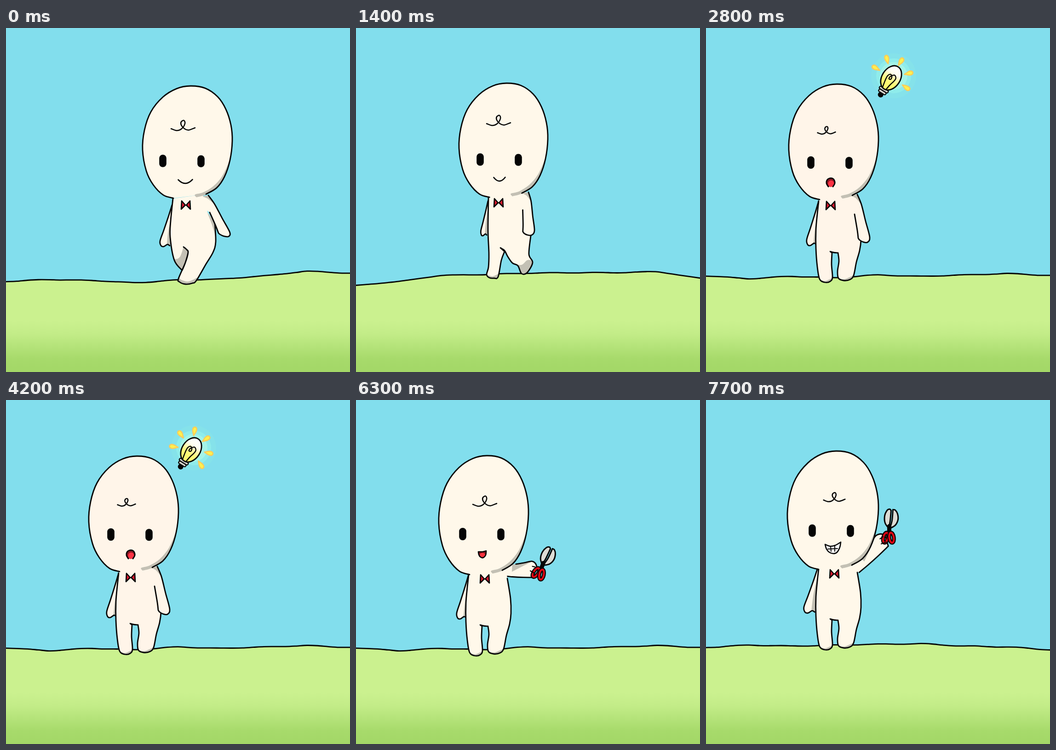
Recreate the animation shown at these times as an HTML page with a canvas. Size 748x748 px, loop 8 s.

```html
<!DOCTYPE html>
<html lang="en">
<head>
<meta charset="utf-8">
<title>A walk and an idea</title>
<style>
  html, body { margin: 0; width: 100%; height: 100%; overflow: hidden; background: #82deed; }
  canvas { display: block; }
</style>
</head>
<body>
<canvas id="stage" width="748" height="748"></canvas>
<script>
const ctx = document.getElementById('stage').getContext('2d');
const SIZE = 748, LOOP = 8000, STEP = 700;
const INK = '#050505', SKIN = '#fff8ea', SHADE = '#c3c0b4', RED = '#d8192f';

// Points are "x,y"; a bar marks a sharp corner at the point before it.
// Shared shapes are placed with [x, y, scaleX, scaleY, shear].
const head = '67,251 45,244 23,221 8,190 0,143 4,99 18,58 44,25 74,6 104,0 136,5 163,24 181,52 192,87 195,123 190,166 178,203 161,228 138,242';
const headShade = '190,164 174,200 154,224 132,238 114,243 117,249 | 138,243 161,228 178,203';
const curl = '-26,5 -14,9 -3,5 4,-6 2,-13 -4,-10 -4,-3 3,5 12,8 26,3';

const leftArm = {
  outline: '0,0 -7,24 -18,59 -26,84 -24,95 -18,97 -10,92 -5,95',
  inner: '15,60',
  shades: ['1,12 -8,60 -12,100 | 2,100']
};
const rightArm = {
  outline: '0,0 9,22 18,58 27,93 22,104 12,103 5,99 2,95 | 0,78 -6,43',
  inner: '-40,8',
  shades: ['-14,2 0,-3 9,22 | -3,8']
};
const raisedArm = {
  outline: '16,-15 34,-19 50,-23 58,-19 62,-11 | 54,12 | 33,13 10,13 -10,12',
  inner: '-20,-8',
  shades: ['8,-17 50,-24 32,-12 8,2']
};
const bodies = {
  standing: {
    outline: '245,378 242,405 239,440 239,480 242,520 247,547 258,554 270,552 275,543 273,515 274,490 | 270,487 | 277,489 287,490 | 289,508 286,530 288,545 299,550 313,548 321,539 327,510 334,485 337,462 336,430 329,386',
    inner: '326,358 | 250,370',
    shades: ['246,546 258,551 274,545 | 270,560 246,560', '287,544 301,547 322,538 | 318,558 288,556', '338,468 328,505 320,545 | 330,545 340,480']
  },
  stride: {
    outline: '363,371 358,420 357,455 366,505 383,527 | 390,510 396,488 393,482 386,476 | 393,482 396,488 390,510 375,545 377,552 390,557 405,555 414,549 435,513 450,488 456,465 454,423',
    inner: '439,402 | 428,362',
    shades: ['360,490 366,502 378,498 386,476 | 396,488 383,528 366,512', '374,541 382,548 397,551 415,543 | 412,560 376,560', '438,402 448,428 455,452 | 458,424']
  },
  step: {
    outline: '288,368 287,440 289,490 288,520 284,536 290,543 300,544 309,541 316,505 323,486 | 314,478 | 323,484 330,497 340,511 352,517 360,534 372,532 384,510 376,492 380,452',
    inner: '366,394 | 370,357',
    shades: ['332,500 345,512 360,515 372,505 380,505 | 388,512 372,536 358,536', '283,536 297,540 312,533 | 306,548 285,546']
  }
};

const poses = {
  stride: { head: [297, 126, 1, .972], body: ['stride'], left: [361, 385, 1, .93], right: [440, 364, 1, .86, .21],
    hair: [385, 214], mouth: ['smile', 390, 330, 15.5], eye: [341, 289], bow: [391, 385] },
  step: { head: [224, 120, .99, .988], body: ['step'], left: [287, 376, .6, .78], right: [375, 357, 1, .9, -.15],
    hair: [310, 203], mouth: ['smile', 312, 325, 12.5], eye: [270, 286], bow: [310, 380] },
  idea: { skin: '#fff5e9', head: [180, 122], body: ['standing', 0, -1], left: [245, 376], right: [329, 362],
    hair: [262, 224, .75], mouth: ['gasp', 271, 336], eye: [228, 292.5], bow: [271, 386] },
  stand: { head: [181, 121, .99, 1.006], body: ['standing'], left: [245, 376], right: [330, 360, 1, .87, .04],
    scissors: [373, 437, 27, .95],
    hair: [270, 217, .8, .7], mouth: ['smile', 271, 327, 12], eye: [227.5, 291.5], bow: [276, 380] },
  show: { head: [184, 115, 1, 1.03], body: ['standing', 4, -4], left: [249, 373], raised: [335, 365, -17, 1],
    hair: [284, 216], mouth: ['laugh', 279, 329], eye: [236, 285.5], bow: [284, 383] },
  grin: { head: [177, 111, 1.015, 1.025], body: ['standing', 0, -11], left: [242, 368, 1.12, .98], raised: [335, 357, -42, 1.33],
    hair: [279, 213, .9], mouth: ['grin', 276, 321], eye: [231, 284], bow: [279, 378] }
};

// Heights of the hilltop at even distances.
const grounds = {
  right: [551, 547, 549, 554, 548, 546, 539, 529, 533],
  hill: [560, 551, 538, 536, 533, 532, 532, 530, 544],
  bumpy: [539, 545, 540, 543, 537, 540, 537, 534, 538],
  flat: [543, 541, 542, 542, 542, 541, 537, 535, 537],
  waves: [548, 541, 539, 542, 534, 539, 542, 544, 543],
  slope: [538, 533, 535, 533, 531, 530, 535, 537, 543]
};

// One entry per 700 ms; the last is cut short by the loop.
// Rays turn around the bulb from the given angle.
const scenes = [
  { pose: 'stride', ground: 'right' },
  { pose: 'stand', dx: 78, dy: 2, ground: 'right', empty: true },
  { pose: 'step', ground: 'hill' },
  { pose: 'stand', dx: 12, dy: 1, ground: 'flat', empty: true },
  { pose: 'idea', ground: 'bumpy', rays: -60, count: 5 },
  { pose: 'idea', ground: 'flat', rays: -72, count: 5 },
  { pose: 'idea', ground: 'bumpy', rays: -82, count: 6 },
  { pose: 'stand', ground: 'slope', empty: true },
  { pose: 'stand', ground: 'flat' },
  { pose: 'show', dx: -4, dy: 6, ground: 'bumpy', turn: 20 },
  { pose: 'show', ground: 'waves' },
  { pose: 'grin', ground: 'slope' }
];

const rad = deg => deg * Math.PI / 180;

function spline(path, pts) {
  for (let i = 0; i < pts.length - 1; i++) {
    const b = pts[i], c = pts[i + 1], a = pts[i - 1] || b, d = pts[i + 2] || c;
    path.bezierCurveTo(b[0] + (c[0] - a[0]) / 6, b[1] + (c[1] - a[1]) / 6,
      c[0] - (d[0] - b[0]) / 6, c[1] - (d[1] - b[1]) / 6, c[0], c[1]);
  }
}

function curve(text, [x = 0, y = 0, sx = 1, sy = sx, shear = 0] = []) {
  const path = new Path2D();
  let last;
  for (const run of text.split('|')) {
    const pts = run.trim().split(' ').map(p => {
      const [a, b] = p.split(',').map(Number);
      return [x + a * sx + b * shear, y + b * sy];
    });
    if (last) pts.unshift(last); else path.moveTo(...pts[0]);
    spline(path, pts);
    last = pts[pts.length - 1];
  }
  return path;
}

function fill(path, color) { ctx.fillStyle = color; ctx.fill(path); }
function line(path, width = 2.8, color = INK) {
  ctx.lineWidth = width; ctx.strokeStyle = color; ctx.stroke(path);
}
function ellipse(x, y, rx, ry, turn = 0) {
  const path = new Path2D();
  path.ellipse(x, y, rx, ry, turn, 0, Math.PI * 2);
  return path;
}
function at(x, y, deg, scale, draw) {
  ctx.save();
  ctx.translate(x, y); ctx.rotate(rad(deg)); ctx.scale(scale, scale);
  draw();
  ctx.restore();
}
function gradient(y0, y1, colors) {
  const g = ctx.createLinearGradient(0, y0, 0, y1);
  colors.forEach(([stop, color]) => g.addColorStop(stop, color));
  return g;
}

// "inner" only widens the filled area, so limbs join without a gap.
function limb(shape, place, skin) {
  const area = curve(shape.outline + ' | ' + shape.inner, place);
  fill(area, skin);
  ctx.save();
  ctx.clip(area);
  shape.shades.forEach(s => fill(curve(s, place), SHADE));
  ctx.restore();
  line(curve(shape.outline, place));
}

function drawGround(name) {
  const heights = grounds[name], gap = SIZE / (heights.length - 1);
  const noise = i => Math.sin(i * 127.1 + heights[0] * 7.3) * .7;
  const pts = [];
  for (let i = 0; i <= 32; i++) {
    const k = Math.min(Math.floor(i / 4), heights.length - 2), t = i / 4 - k;
    const ease = t * t * (3 - 2 * t);
    pts.push([i * gap / 4, heights[k] + (heights[k + 1] - heights[k]) * (ease + t) / 2 + noise(i)]);
  }
  const edge = new Path2D();
  edge.moveTo(...pts[0]);
  spline(edge, pts);
  const land = new Path2D(edge);
  land.lineTo(SIZE, SIZE); land.lineTo(0, SIZE);
  fill(land, gradient(540, SIZE,
    [[0, '#cbf18f'], [.46, '#cbf18f'], [.6, '#c3ec88'], [.72, '#b6e47b'], [.86, '#a7da6b'], [1, '#a3d767']]));
  line(edge);
}

function drawScissors(x, y, deg, scale) {
  at(x, y, deg, scale, () => {
    for (const blade of ['-1,-3 -9,-15 -10,-30 -5,-42 1,-45 4,-42 | 2,-20 -1,-3', '1,-3 13,-10 19,-22 18,-35 13,-43 8,-44 | 6,-20 1,-3']) {
      const path = curve(blade);
      fill(path, '#dddcd5');
      line(path, 3);
    }
    line(curve('0,-8 0,3'), 9);
    for (const [hx, tilt] of [[-8, .25], [5, -.15]]) {
      const loop = ellipse(hx, 17, 5, 11, tilt);
      line(loop, 8.5);
      line(loop, 4, '#e30613');
    }
  });
}

const mouths = {
  smile(w) {
    const path = new Path2D();
    path.moveTo(-w, 0);
    path.quadraticCurveTo(0, 16, w, -.5);
    line(path, 2.6);
  },
  gasp() {
    fill(ellipse(0, 0, 8.5, 9.5), '#8c1522');
    fill(ellipse(1, 2.5, 6.5, 7), '#fb3344');
    line(curve('5,9 9,2 8,-5 4,-9 -3,-9 -8,-5 -9,2 -5,9'));
  },
  laugh() {
    const lips = curve('-9,-5 0,-5 8,-7 | 7,2 1,8 -5,6 -8,1 -9,-5');
    fill(lips, '#8c1522');
    fill(ellipse(0, 2, 6, 4.5), '#f7333f');
    line(lips, 2.6);
  },
  grin() {
    const lips = curve('-17,-7 -6,-3 5,-5 17,-12 | 15,-1 9,10 1,13 -8,10 -14,3 -17,-7');
    fill(lips, '#fff');
    line(lips, 2.6);
    ['-11,3 10,2', '-5,-3 -4,8', '4,-4 4,8'].forEach(t => line(curve(t), 2));
  }
};

function drawBow([x, y]) {
  for (const side of [-1, 1]) {
    const wing = curve('1,0 | 9,-9 | 10,9 | 1,0', [x, y, side, 1]);
    fill(wing, RED);
    line(wing, 2.6);
  }
}

function drawEyes([x, y]) {
  ctx.fillStyle = INK;
  for (const [cx, cy, h] of [[x, y, 27], [x + 83, y + .7, 26]]) {
    ctx.beginPath();
    ctx.roundRect(cx - 7.8, cy - h / 2, 15.6, h, 7.5);
    ctx.fill();
  }
}

function drawFigure({ pose, dx = 0, dy = 0, turn = 0, empty }) {
  const p = poses[pose], skin = p.skin || SKIN;
  const [bodyName, ...bodyAt] = p.body;
  const [mouth, mx, my, width] = p.mouth;
  const raise = draw => {
    const [x, y, angle, reach] = p.raised;
    at(x, y, angle + turn, 1, () => draw(reach, angle));
  };

  ctx.save();
  ctx.translate(dx, dy);
  limb(leftArm, p.left, skin);
  if (p.raised) raise(reach => limb(raisedArm, [0, 0, reach, 1], skin));
  limb(bodies[bodyName], bodyAt, skin);
  if (p.right) limb(rightArm, p.right, skin);

  const face = curve(head, p.head);
  fill(face, skin);
  fill(curve(headShade, p.head), SHADE);
  line(face);
  line(curve(curl, p.hair), 2.5);
  drawEyes(p.eye);
  at(mx, my, 0, 1, () => mouths[mouth](width));
  drawBow(p.bow);

  if (p.raised) raise((reach, angle) => {
    drawScissors(73 * reach, -13, -angle, 1);
    ['52,-12 58,-11', '48,-2 56,2'].forEach(f => line(curve(f, [0, 0, reach, 1]), 2.2));
  });
  else if (p.scissors && !empty) drawScissors(...p.scissors);
  ctx.restore();
}

function drawBulb(turn, count) {
  [[49, '#85e2ea'], [38, '#8feceb'], [30, '#a4f4e8']].forEach(([r, c]) => fill(ellipse(408, 104, r, r), c));
  const drop = curve('0,10 -4,0 -4,-6 0,-9 4,-6 4,0 0,10');
  for (let i = 0; i < count; i++) {
    const deg = turn + i * 46;
    at(403 + 39 * Math.sin(rad(deg)), 107 - 40 * Math.cos(rad(deg)), deg, 1, () => {
      fill(drop, '#fff04d');
      line(drop, 2.4, '#fccb5c');
    });
  }
  at(402.5, 108.5, 32, 1, () => {
    const glass = ellipse(0, 0, 20, 28.5);
    fill(ellipse(0, 43, 6, 6), INK);
    for (const [y, w] of [[36, 6], [30, 8]]) {
      const band = curve(`${-w},${y} ${w},${y}`);
      line(band, 8);
      line(band, 3.6, '#d5d3cc');
    }
    fill(glass, gradient(-28, 28, [[0, '#fff'], [.3, '#fffef0'], [.45, '#fffbb0'], [.65, '#fffa78'], [1, '#fff96a']]));
    line(glass);
    line(curve('-5,27 -8,12 -9,0 -5,-6 0,-3 1,3 -3,4 -3,-2 3,-9 9,-5 9,3 6,14 4,27'), 2.4);
  });
}

function draw(now) {
  const scene = scenes[Math.floor((now % LOOP) / STEP)];
  ctx.lineCap = ctx.lineJoin = 'round';
  ctx.fillStyle = '#82deed';
  ctx.fillRect(0, 0, SIZE, SIZE);
  drawGround(scene.ground);
  if (scene.count) drawBulb(scene.rays, scene.count);
  drawFigure(scene);
}

const start = performance.now();
function tick() {
  draw(performance.now() - start);
  requestAnimationFrame(tick);
}
tick();
</script>
</body>
</html>
```
